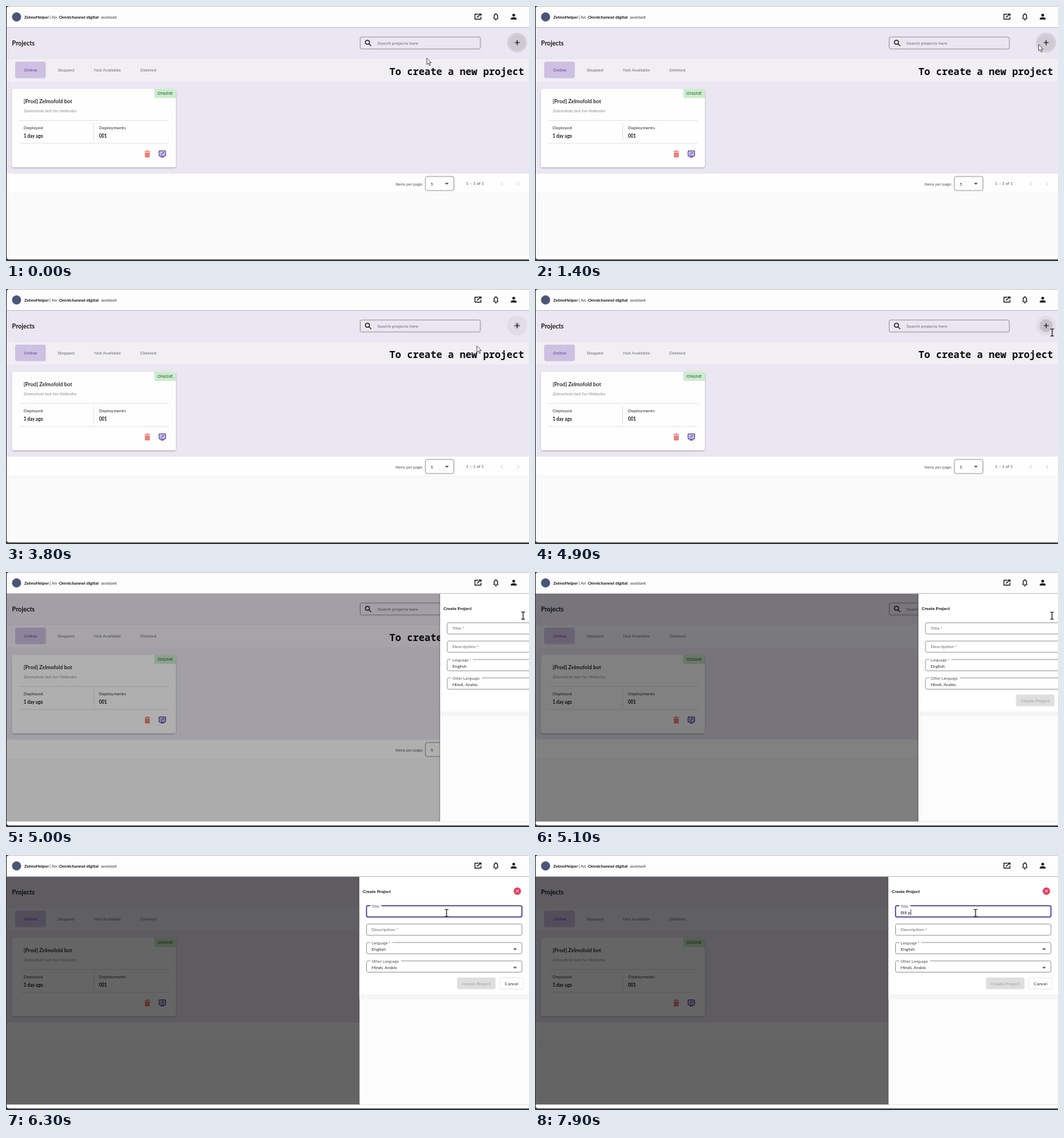
Write an HTML page that moves like this. It is 742 px wide and 362 px high and loops after 8 s.

```html
<!DOCTYPE html>
<html lang="en">
<head>
<meta charset="utf-8">
<title>Create a project</title>
<style>
html, body { margin: 0; width: 100%; height: 100%; overflow: hidden; background: #3a393c; }
svg { display: block; width: 742px; height: 362px; }
text { font: 6.5px Lato, "Open Sans", sans-serif; fill: #333; }
.b { font-weight: 700; fill: #151515; }
.mid { text-anchor: middle; }
.soft { fill: #6c6c70; }
.small { font-size: 5.5px; fill: #555; }
.hint { font-family: "Noto Sans Mono", "DejaVu Sans Mono", monospace; font-size: 13.85px; font-weight: 700; fill: #0a0a0a; }
.box { fill: none; stroke: #85858a; stroke-width: .8; }
.line { stroke: #dedee0; stroke-width: .8; }
.ink { fill: none; stroke: #161616; stroke-width: 1.2; }
.focus .title-box { stroke: #4b3796; stroke-width: 1.5; }
.focus .title-label { fill: #5b459f; }
.floated, .focus .placeholder { display: none; }
.focus .floated { display: inline; }
</style>
</head>
<body>
<svg viewBox="0 0 742 362">
  <defs>
    <filter id="shade" x="-10%" y="-20%" width="120%" height="150%">
      <feDropShadow dx="0" dy="1" stdDeviation="1" flood-opacity=".28"/>
    </filter>
    <clipPath id="page"><path d="M1 4q0-3.500 3.500-3.500H742V359.500H4.500q-3.500 0-3.500-3.500z"/></clipPath>
    <path id="down" d="M-2.700-1.200h5.400L0 1.500z" fill="#555"/>
  </defs>

  <g clip-path="url(#page)">
    <path fill="#fafafa" d="M0 0h742v362H0z"/>
    <path fill="#ebe7f2" d="M0 30h742v208H0z"/>
    <path fill="#f1eff4" d="M0 74.500h742v32.500H0z"/>
    <path fill="#e0dde6" d="M0 74h742v.6H0z"/>
    <path fill="#fefefe" d="M0 238h742v27.500H0z"/>
    <path fill="#f2f2f2" d="M0 265.500h742v.8H0z"/>

    <text class="b" x="8.500" y="55.700" style="font-size:8.900px">Projects</text>
    <rect class="box" x="502.500" y="44" width="170.500" height="17" rx="2"/>
    <g class="ink"><circle cx="512.800" cy="51.500" r="2.900"/><path d="M515 53.700l3.200 3.200"/></g>
    <text class="soft" x="527" y="55">Search projects here</text>
    <g id="halo"><circle cx="725" cy="52"/><circle cx="725" cy="52"/></g>
    <path class="ink" d="M721.800 52h6.900M725.200 48.500v7"/>

    <rect x="13" y="79" width="43.500" height="23.500" rx="3" fill="#cdc0e2"/>
    <text class="mid" x="35" y="93.300" style="fill:#6741a5">Online</text>
    <text class="mid soft" x="85" y="93.300">Stopped</text>
    <text class="mid soft" x="144" y="93.300">Not Available</text>
    <text class="mid soft" x="202" y="93.300">Deleted</text>
    <text class="hint" x="544" y="97.500">To create a new project</text>

    <rect x="8.500" y="117.500" width="232.500" height="111.500" rx="3.500" fill="#fefefe" filter="url(#shade)"/>
    <path d="M210.500 117.500h27q3.500 0 3.500 3.500v9.500h-30.500z" fill="#cbeccd"/>
    <text class="mid" x="225.800" y="126" style="font-size:5.800px;fill:#234f29">ONLINE</text>
    <text class="b" x="25" y="137.500" style="font-size:7.500px;font-weight:600">[Prod] Zelmofold bot</text>
    <text x="25" y="151.200" style="fill:#919195">Zelmofold bot for Website</text>
    <path class="line" d="M19 162.500h212M19 195h212M124.500 166.500v25"/>
    <text x="25" y="175.200">Deployed</text>
    <text class="b" x="25" y="186.500">1 day ago</text>
    <text x="132" y="175.200">Deployments</text>
    <text class="b" x="132" y="186.500">001</text>
    <path fill="#ee8179" d="M196.500 206h2l.8-1h2.400l.8 1h2v1.300h-8zM197 208h7v5.800q0 1.200-1.200 1.200h-4.600q-1.200 0-1.200-1.200z"/>
    <g fill="none" stroke="#4e2f9d" stroke-width="1.200">
      <rect x="217.300" y="205.800" width="9" height="7" rx=".8"/>
      <path d="M219 208.300h1m1 0h3.700M219 210.400h3.500m1 0h1.200M219.500 214.500h4.700"/>
    </g>

    <text class="small" x="552.700" y="254.500" style="font-size:5.800px">Items per page:</text>
    <rect class="box" x="595" y="242" width="40.500" height="20" rx="2.500"/>
    <text x="602.500" y="254.700" style="font-size:6px">5</text>
    <use href="#down" x="625.500" y="252.300"/>
    <text class="small" x="652.700" y="254.200" style="font-size:6px">1 – 1 of 1</text>
    <path d="M704.700 249.800l-2.600 2.700 2.600 2.700M725.300 249.800l2.600 2.700-2.600 2.700" fill="none" stroke="#c2c2c4" stroke-width=".9"/>

    <path id="backdrop" d="M0 31h742v323.500H0z" opacity="0"/>
    <path fill="#fefefe" d="M0 354.500h742v6H0z"/>

    <g id="panel">
      <path fill="#000" opacity=".13" d="M500 31h2v323.500h-2z"/>
      <path fill="#fcfcfc" d="M501.500 31h246v323.500h-246z"/>
      <path fill="#f5f5f5" d="M501.500 198h246v6.500h-246z"/>
      <path fill="#fff" d="M501.500 31h246v167h-246z"/>
      <text class="b" x="506" y="53.500" style="font-size:6.300px">Create Project</text>
      <circle id="ring" cx="725.500" cy="51.300" r="11" fill="#f1edf0"/>
      <circle cx="725.500" cy="51.300" r="5.200" fill="#e63a5e"/>
      <path d="M723.500 49.300l4 4m0-4l-4 4" stroke="#fff" stroke-width="1"/>

      <g id="title">
        <rect class="box title-box" x="511.500" y="72" width="220.500" height="16" rx="2.200"/>
        <text class="soft placeholder" x="518.700" y="82.300">Title *</text>
        <g class="floated">
          <path fill="#fff" d="M517 70.500h16v3h-16z"/>
          <text class="small title-label" x="518.700" y="75">Title *</text>
        </g>
        <text id="typed" x="518.700" y="83.800" xml:space="preserve" style="fill:#222"></text>
        <path id="caret" d="M0 77.300v8.400" stroke="#222" stroke-width=".8"/>
      </g>
      <rect class="box" x="511.500" y="98" width="220.500" height="16" rx="2.200"/>
      <text class="soft" x="518.700" y="108.300">Description *</text>
      <rect class="box" x="511.500" y="124.200" width="220.500" height="16" rx="2.200"/>
      <path fill="#fff" d="M517 122.700h31v3h-31z"/>
      <text class="small" x="518.700" y="127">Language *</text>
      <text x="518.700" y="136">English</text>
      <use href="#down" x="722.300" y="133.800"/>
      <rect class="box" x="511.500" y="150.300" width="220.500" height="16" rx="2.200"/>
      <path fill="#fff" d="M517 148.800h43.500v3H517z"/>
      <text class="small" x="518.700" y="153.200">Other Language</text>
      <text x="518.700" y="162">Hindi, Arabic</text>
      <use href="#down" x="722.300" y="159.900"/>
      <rect x="640" y="174" width="54.500" height="16.500" rx="2" fill="#dedede"/>
      <text class="mid" x="667.200" y="184.600" style="fill:#a0a0a0">Create Project</text>
      <rect x="700.500" y="174.300" width="33.500" height="16" rx="2" fill="#fff" stroke="#e4e4e4" stroke-width=".8"/>
      <text class="mid" x="717.200" y="184.600">Cancel</text>
    </g>

    <path fill="#fdfdfd" d="M0 0h742v30H0z"/>
    <path fill="#c4c2c8" d="M0 30h742v1H0z"/>
    <circle cx="15" cy="15.500" r="6.500" fill="#4a5677"/>
    <text class="b" x="26" y="17.800" style="font-size:6px">ZelmoHelper</text>
    <text x="61.500" y="17.800" style="font-size:6.300px">| An</text>
    <text class="b" x="75" y="17.800" style="font-size:6.350px">Omnichannel digital</text>
    <text x="134.700" y="17.800" style="font-size:5.900px">assistant</text>
    <g class="ink">
      <path d="M670.500 11.700h-5.200v7h8.500v-3.500M668.300 16.200l5.200-4.700M671 11.300h3v2.800"/>
      <path d="M691.500 18h7M692.500 18v-3.300q0-3 2.500-3t2.500 3V18M695 10.300v1M694 19.600h2"/>
    </g>
    <g fill="#161616"><circle cx="720.300" cy="13" r="2.100"/><path d="M716.200 19.200v-1q0-2.300 4.100-2.300t4.100 2.300v1z"/></g>
  </g>

  <path id="arrow" d="M0 0v9l2.100-1.900 1.500 3.500 1.500-.7-1.500-3.300h2.700z" fill="#fff" stroke="#222" stroke-width=".7"/>
  <path id="beam" d="M-2.600-5h1.600q1 0 1 1v8q0 1-1 1h-1.600M2.600-5H1Q0-5 0-4M2.600 5H1Q0 5 0 4" fill="none" stroke="#161616" stroke-width="1.100"/>
</svg>
<script>
const LOOP = 8000, STEP = 100;
const $ = id => document.getElementById(id);
const [outer, inner] = $('halo').children;

// Rows are [time, ...values], interpolated linearly.
const CURSOR = [[0, 597, 74], [300, 650, 66], [700, 711.5, 54.5], [800, 711.5, 54.5], [900, 714.500, 54.700],
  [2900, 714.500, 54.700], [3500, 672, 80], [3700, 659, 84], [4500, 731, 58], [4700, 734, 61.500], [5100, 733.500, 62],
  [5200, 687, 73], [5300, 658, 78], [5500, 632, 82], [5800, 625, 82.300]];
const OUTER = [[0, 14, .095], [1300, 14, .095], [2200, 16.800, .065], [2900, 16.800, .065], [3500, 14, .045]];
const INNER = [[0, 11.500, .035], [1300, 11.500, .035], [2200, 14, 0], [4600, 0, .12], [4900, 9.300, .12]];
const SLIDE = [[4900, 0], [5000, .523], [5100, .823], [5200, .979], [5300, 1]];
const KEYS = [6600, 6900, 7100, 7300, 7500, 7900];
const WORD = 'Bill p';

function track(rows, t) {
  const i = rows.findIndex(r => r[0] > t);
  if (i < 0) return rows[rows.length - 1].slice(1);
  if (i === 0) return rows[0].slice(1);
  const a = rows[i - 1], b = rows[i], k = (t - a[0]) / (b[0] - a[0]);
  return a.slice(1).map((v, j) => v + (b[j + 1] - v) * k);
}

const show = (el, on) => { el.style.display = on ? '' : 'none'; };

function disc(el, [r, alpha]) {
  el.setAttribute('r', r);
  el.setAttribute('opacity', alpha);
}

function draw(t) {
  disc(outer, track(OUTER, t));
  disc(inner, track(INNER, t));

  const [open] = track(SLIDE, t);
  show($('panel'), open > 0);
  $('panel').setAttribute('transform', `translate(${240 * (1 - open)})`);
  $('backdrop').setAttribute('opacity', .6 * open);

  const focused = t >= 5700;
  show($('ring'), !focused);
  $('title').setAttribute('class', focused ? 'focus' : '');
  const typed = $('typed');
  typed.textContent = WORD.slice(0, KEYS.filter(k => k <= t).length);
  show($('caret'), focused && t !== 6300);
  const end = typed.textContent ? typed.getComputedTextLength() : 0;
  $('caret').setAttribute('transform', `translate(${519 + end})`);

  const beam = t >= 4700 && t < 5200 || t >= 5300;
  show($('beam'), beam);
  show($('arrow'), !beam);
  $(beam ? 'beam' : 'arrow').setAttribute('transform', `translate(${track(CURSOR, t)})`);
}

const start = performance.now();
function tick() {
  const t = (performance.now() - start + 5) % LOOP;
  draw(Math.floor(t / STEP) * STEP);
  requestAnimationFrame(tick);
}
tick();
</script>
</body>
</html>
```
